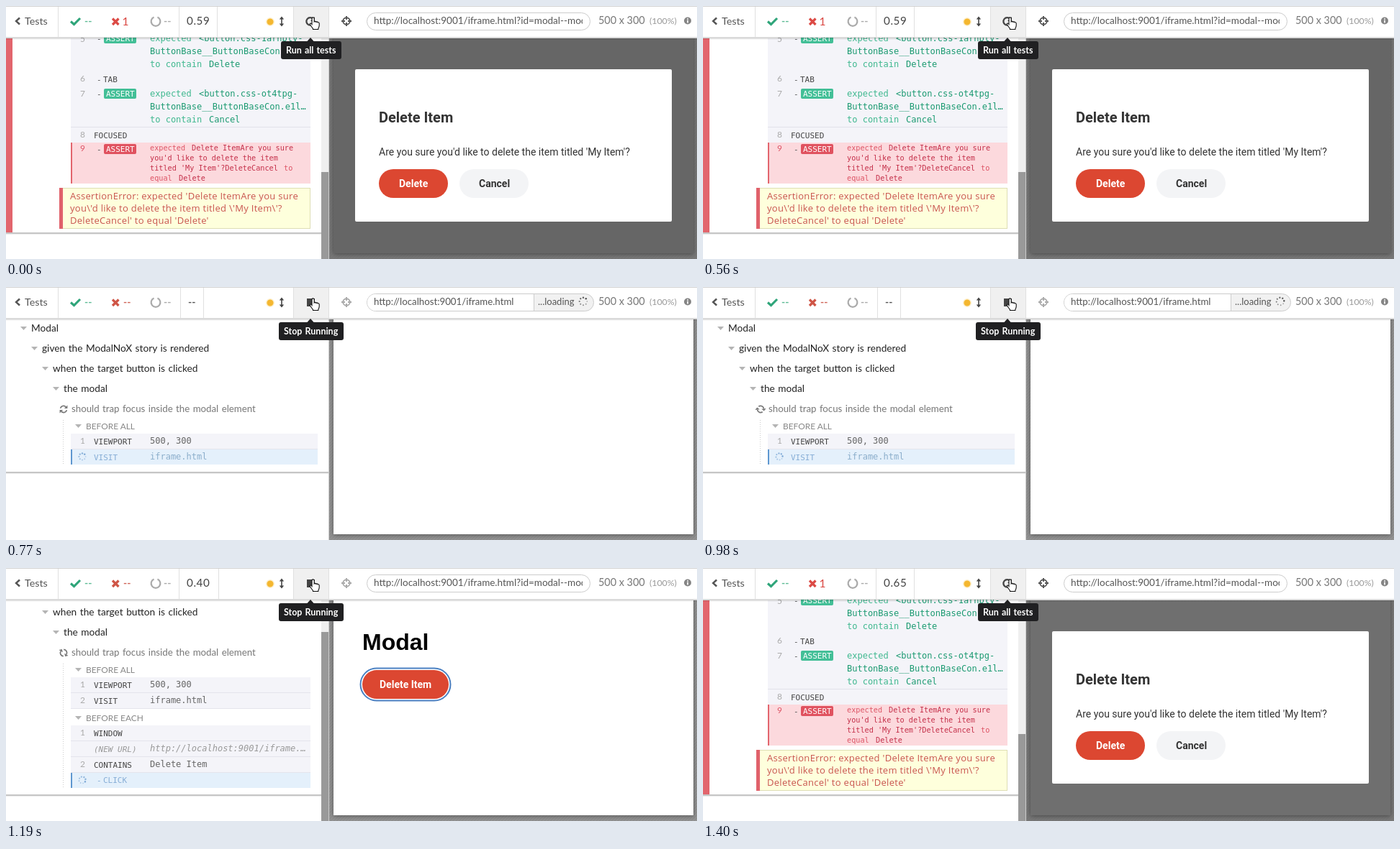
Animation, 960 px wide and 352 px high, one loop 1470 ms. Source, as an HTML page:

```html
<!DOCTYPE html>
<html lang="en">
<head>
<meta charset="utf-8">
<title>Test runner</title>
<style>
html, body { margin: 0; width: 100%; height: 100%; overflow: hidden; background: #fff; }
svg { display: block; width: 100%; height: 100%; font-family: Lato, sans-serif; }
.mono { font-family: "DejaVu Sans Mono", monospace; }
.rob { font-family: Roboto, sans-serif; }
.ari { font-family: "Liberation Sans", Arial, sans-serif; }
.err { font-family: "Open Sans", sans-serif; letter-spacing: .3px; }
.word { word-spacing: 1px; }
.wide { letter-spacing: .6px; }
.b { font-weight: 700; }
.light { font-weight: 300; }
.it { font-style: italic; }
</style>
</head>
<body>
<svg id="stage" viewBox="0 0 960 352"></svg>
<script>
const FRAME = 70, LOOP = 1470;
const esc = s => s.replace(/&/g, '&amp;').replace(/</g, '&lt;');
const text = (x, y, s, size, fill, cls = '', more = '') =>
  `<text x="${x}" y="${y}" font-size="${size}" fill="${fill}" class="${cls}" ${more}>${esc(s)}</text>`;
const rect = (x, y, w, h, fill, more = '') =>
  `<rect x="${x}" y="${y}" width="${w}" height="${h}" fill="${fill}" ${more}/>`;
const line = (d, stroke, w = 1, more = '') =>
  `<path d="${d}" fill="none" stroke="${stroke}" stroke-width="${w}" ${more}/>`;
const shape = (d, fill) => `<path d="${d}" fill="${fill}"/>`;
const group = (id, body, more = '') => `<g id="${id}" ${more}>${body}</g>`;
const mono = (x, y, s, fill, size = 12, cls = '') => text(x, y, s, size, fill, 'mono ' + cls);

function dots(x, y, r, color) {
  let s = '';
  for (let i = 0; i < 8; i++) {
    const a = i * Math.PI / 4;
    s += `<circle cx="${(r * Math.cos(a)).toFixed(2)}" cy="${(r * Math.sin(a)).toFixed(2)}" r="${.85 + i * .06}" opacity="${.5 + i * .07}"/>`;
  }
  return `<g transform="translate(${x} ${y})"><g class="spin" fill="${color}">${s}</g></g>`;
}

// Command log
const caret = (x, y) => shape(`M${x} ${y}h9l-4.5 5z`, '#b4b4b4');
const suite = (x, y, s) => caret(x - 15, y - 7) + text(x, y, s, 13.7, '#222', 'word');
const hook = (y, s) => caret(96, y - 7) + text(111, y, s, 11.9, '#888');
const num = (y, n) => text(103, y, n, 12, '#aaa');
const row = (y, w, n, name, msg, cls = '') =>
  rect(90, y, w, 21, '#f4f4f9') + rect(90, y + 21, w, 1, '#e4e4ec') + num(y + 14, n) +
  mono(122, y + 15, name, cls ? '#999' : '#444', 11, cls) +
  mono(200, y + 14, msg, cls ? '#999' : '#666', 12, cls);
const active = (y, w) =>
  rect(90, y, w, 21, '#e4f0fb') + rect(90, y, 2, 21, '#5f97d0') + dots(106, y + 10, 4.6, '#7ea9d6');
const reload = (x, y) => `<g transform="translate(${x} ${y})"><g class="spin">` +
  line('M-4.4 -1.3A4.5 4.5 0 0 1 3.2 -3.2M4.4 1.3A4.5 4.5 0 0 1 -3.2 3.2', '#777', 1.7) +
  shape('M5.4-5.4V-.9H.9ZM-5.4 5.4V.9H-.9Z', '#777') + '</g></g>';
const edge = (y, w) => rect(0, y, w, 2, '#c6c6c6') + rect(0, y + 2, w, 1, '#ececec');
const bar = y => rect(438, 45, 10, 307, '#efefef') + rect(438, y, 10, 352 - y, '#999');
const trail = (y, h) => line(`M79.5 ${y}v${h}`, '#ccc', 1, 'stroke-dasharray="1 2"');

const tree = suite(35, 62, 'Modal') + suite(50, 90, 'given the ModalNoX story is rendered') +
  suite(65, 118, 'when the target button is clicked') + suite(80, 146, 'the modal') +
  reload(80, 170) + text(91, 174, 'should trap focus inside the modal element', 13.27, '#777', 'word') +
  hook(198, 'BEFORE ALL');

const visiting = tree + trail(185, 63) + row(204, 343, '1', 'VIEWPORT', '500, 300') + active(226, 343) +
  mono(122, 241, 'VISIT', '#86add6', 11) + mono(200, 240, 'iframe.html', '#8baecb') + edge(257, 448);

const clicking = `<g transform="translate(0 -52)">${tree}</g>` + trail(133, 172) +
  row(152, 333, '1', 'VIEWPORT', '500, 300') + row(174, 333, '2', 'VISIT', 'iframe.html') +
  hook(213, 'BEFORE EACH') + row(219, 333, '1', 'WINDOW', '') +
  row(241, 333, '', '(NEW URL)', 'http://localhost:9001/iframe.…', 'it') +
  row(263, 333, '2', 'CONTAINS', 'Delete Item') + active(285, 333) +
  mono(126, 299, '-', '#86add6', 11) + mono(135, 299, 'CLICK', '#86add6', 11) + edge(315, 438) + bar(89);

const GREEN = '#3fb88f', DEEP = '#1b9a71', PINK = '#dd5566', ROSE = '#c42f49';
const badge = (y, fill) => mono(126, y + 11, '-', '#555', 11) +
  rect(136, y, 45, 14, fill, 'rx="2"') + mono(139, y + 11, 'ASSERT', '#fff', 11);
const passed = (y, sel, what) => badge(y - 11, '#43bf97') +
  mono(200, y, 'expected', GREEN) + mono(268, y, sel, DEEP) +
  mono(200, y + 18, 'ButtonBase__ButtonBaseCon.e1l…', DEEP) +
  mono(200, y + 36, 'to contain', GREEN) + mono(282, y + 36, what, DEEP);
const small = (x, y, s, fill) => mono(x, y, s, fill, 10.2);

const failed = rect(0, 45, 9, 270, '#e2656d') + rect(90, 45, 333, 145, '#f4f4f9') +
  rect(90, 168, 333, 1, '#e2e2ea') +
  num(50, '5') + passed(49, '<button.css-1arnbly-', 'Delete') +
  num(105, '6') + mono(126, 106, '-', '#555', 11) + mono(135, 106, 'TAB', '#444', 11) +
  num(126, '7') + passed(126, '<button.css-ot4tpg-', 'Cancel') +
  num(183, '8') + mono(122, 184, 'FOCUSED', '#444', 11) +
  rect(90, 190, 333, 57, '#fcd9dd') + rect(90, 190, 2, 57, '#e2656d') +
  text(103, 202, '9', 12, PINK) + badge(192, '#e0525f') +
  small(200, 201, 'expected', PINK) + small(258, 201, 'Delete ItemAre you sure', ROSE) +
  small(200, 215, "you'd like to delete the item", ROSE) +
  small(200, 229, "titled 'My Item'?DeleteCancel", ROSE) + small(386, 229, 'to', PINK) +
  small(200, 243, 'equal', PINK) + small(240, 243, 'Delete', ROSE) +
  rect(74.5, 253.5, 348, 56, '#feffdc', 'stroke="#dedeb4"') + rect(74, 253, 5, 57, '#e0616b') +
  ["AssertionError: expected 'Delete ItemAre you sure",
   "you\\'d like to delete the item titled \\'My Item\\'?",
   "DeleteCancel' to equal 'Delete'"].map((s, i) => text(89, 269 + 17 * i, s, 13, '#c9544f', 'err')).join('') +
  edge(315, 438) + bar(231);

// Preview pages
const house = '<g transform="translate(-.5 -1)">' +
  line('M677 150L704.5 126.5L733 150', '#444', 5, 'stroke-linejoin="round"') +
  shape('M717 124h9v17l-9-7.5z', '#444') +
  shape('M684 150.5L704.5 133.5L726 150.5V168q0 3-3 3H710V156H700V171H687q-3 0-3-3z', '#444') + '</g>';
const blank = rect(475, 64, 460, 290, '#f2f2f2', 'rx="5"') + house +
  text(574, 212, 'This is the default blank page.', 20, '#444', 'rob light') +
  text(579.5, 256, 'To test your web application:', 20, '#444', 'rob light') +
  rect(595, 278, 220, 90, '#dfdfdf', 'rx="8"') +
  text(619.5, 316, '1.', 14.2, '#333', 'ari') + text(635, 316, "Start your app's server", 14.2, '#333', 'ari') +
  text(619.5, 340, '2.', 14.2, '#333', 'ari') + rect(635, 325, 84, 21, '#777', 'rx="3"') +
  text(640, 340, 'cy.visit()', 12.4, '#fff', 'mono b') + text(723, 340, 'your app', 14.2, '#333', 'ari');

const story = text(495, 114, 'Modal', 32, '#000', 'ari b') +
  rect(492.5, 139.5, 125, 45, '#fff', 'rx="22.5" stroke="#4a80c2" stroke-width="2"') +
  rect(495, 142, 120, 40, '#dc4731', 'rx="20"') + text(519, 167, 'Delete Item', 14, '#fff', 'rob b');

const dialog = rect(455, 45, 500, 299, '#000', 'id="shade"') +
  rect(484, 87, 442, 214, '#6d9dec', 'id="ring" rx="2" stroke="#6d9dec" stroke-width="3"') +
  rect(485, 88, 440, 212, '#fff', 'rx="2"') +
  text(518, 162, 'Delete Item', 20, '#333', 'rob b') +
  text(518, 208, "Are you sure you'd like to delete the item titled 'My Item'?", 14, '#333', 'rob') +
  rect(518, 227, 96, 40, '#dc4731', 'rx="20"') + text(546, 252, 'Delete', 14, '#fff', 'rob b') +
  rect(630, 227, 96, 40, '#f3f4f6', 'rx="20"') + text(657, 252, 'Cancel', 14, '#333', 'rob b');

// Toolbar
const sep = (x, more) => rect(x, 1, 1, 43, '#e0e0e0', more);
const toolbar = rect(0, 44, 960, 3, 'url(#drop)') + rect(0, 0, 960, 44, '#fff') + rect(399, 0, 49, 44, '#f0f0f0') +
  sep(72) + sep(399) + sep(448) + sep(240, 'id="sepA"') + sep(293, 'id="sepB"') +
  rect(0, 0, 960, 1, '#d2d2d2') + rect(0, 43, 960, 1, '#dedede') +
  line('M19 16.5L14 21L19 25.5', '#555', 2.4) + text(26, 26, 'Tests', 14.3, '#555') +
  line('M90 21.5L94.5 25.5L103 17', '#2fa57a', 3.1) + text(109, 26, '--', 14, '#5dbb95', 'b') +
  group('cross', line('M148 17.5L156.5 26M156.5 17.5L148 26', 'currentColor', 3.2)) +
  text(163, 26, '--', 14, '#cf6558', 'b', 'id="none"') + text(161.5, 26.5, '1', 15.5, '#d9443f', '', 'id="one"') +
  line('M205.5 15.5A6.4 6.4 0 1 0 210.5 15.5', '#aaa', 2.2) + text(219, 26, '--', 14, '#aaa', 'b') +
  text(251, 26, '0.59', 15.2, '#444', 'wide', 'id="timer"') + text(253, 26, '--', 14, '#555', 'b', 'id="unset"') +
  '<circle cx="367" cy="22" r="5.3" fill="#f4b730" stroke="#fdf0cf" stroke-width="1.5"/>' +
  line('M383 17V26', '#444', 1.6) + shape('M383 14.5l3.2 4h-6.4zM383 28.5l3.2-4h-6.4z', '#444') +
  group('rerun', line('M426.5 18A5.2 5.2 0 1 0 427.5 23', '#444', 2.3) + shape('M429 15v6h-6z', '#444')) +
  group('stop', rect(418, 16, 11, 11, '#444')) +
  group('aim', '<circle cx="473" cy="21" r="4.8" fill="none" stroke-width="1.9"/>' +
    '<path d="M473 14V19M473 23V28M466 21H471M475 21H480" stroke-width="1.9"/>') +
  group('urlLong', rect(501.5, 9.5, 310, 24, '#fff', 'rx="12" stroke="#ccc"') +
    `<g clip-path="url(#urlClip)">${text(511, 25, 'http://localhost:9001/iframe.html?id=modal--modal', 13.5, '#555')}</g>`) +
  group('urlLoad', rect(501.5, 9.5, 315, 24, '#f1f1f1', 'rx="12" stroke="#ccc"') +
    shape('M733 10H513.5a11.5 11.5 0 0 0 0 23H733z', '#fff') + rect(733, 10, 1, 23, '#ccc') +
    text(511, 25, 'http://localhost:9001/iframe.html', 13.25, '#555') +
    text(739, 25, '...loading', 13, '#555') + dots(802, 20, 5.3, '#555')) +
  text(823, 25, '500 x 300', 14.4, '#777') + text(894, 25, '(100%)', 12.3, '#999') +
  '<circle cx="947" cy="20.5" r="5" fill="#858585"/>' + rect(946.2, 19.7, 1.7, 3.8, '#fff') + rect(946.2, 17.2, 1.7, 1.6, '#fff');

const tip = (id, x, w, s) => group(id, rect(x, 49, w, 25, '#202022', 'rx="3"') + shape('M418 49.5L423 44L428 49.5z', '#202022') +
  text(x + 7, 66, s, 12.5, '#fff', 'b word'));
const hand = '<path d="M425 17.5a1.6 1.6 0 0 1 3.2 0V22c.8-1 2.4-.8 2.6.3 .8-.8 2.2-.5 2.4.6 .9-.5 2 0 2 1.2V27c0 2-1 3-1.4 4.5V32.500H426.500V31.500c-1-1.5-3.5-4.5-4.2-6 -.5-1.2 1-2 2-.9l.7.9z" fill="#fff" stroke="#111" stroke-width="1.1"/>';

const svg = document.getElementById('stage');
svg.innerHTML = `<defs>
  <pattern id="hatch" width="3" height="3" patternUnits="userSpaceOnUse" patternTransform="rotate(45)">
    ${rect(0, 0, 3, 3, '#959595')}${rect(0, 0, 1.5, 3, '#8b8b8b')}</pattern>
  <linearGradient id="drop" x2="0" y2="1"><stop stop-opacity=".2"/><stop offset="1" stop-opacity="0"/></linearGradient>
  <filter id="blur" x="-10%" y="-10%" width="120%" height="120%"><feGaussianBlur stdDeviation="3"/></filter>
  <clipPath id="urlClip">${rect(505, 9, 296, 25, '#000')}</clipPath>
  <clipPath id="page">${rect(455, 45, 500, 299, '#000')}</clipPath>
  <clipPath id="right">${rect(449, 45, 511, 307, '#000')}</clipPath>
  </defs>` + rect(0, 0, 960, 352, '#fff') +
  group('failed', failed) + group('visiting', visiting) + group('clicking', clicking) +
  `<g clip-path="url(#right)">` + rect(449, 45, 511, 307, 'url(#hatch)') +
  rect(449, 45, 511, 307, '#666', 'id="dim" opacity=".6"') +
  rect(455, 40, 500, 305, '#000', 'opacity=".4" filter="url(#blur)"') + rect(455, 45, 500, 299, '#fff') + '</g>' +
  `<g clip-path="url(#page)">` + group('blank', blank) + group('story', story) + group('dialog', dialog) + '</g>' +
  rect(448, 45, 1, 307, '#ccc') + toolbar + tip('tipRun', 382, 84, 'Run all tests') + tip('tipStop', 379, 90, 'Stop Running') + hand;

const el = {};
svg.querySelectorAll('[id]').forEach(n => el[n.id] = n);
const spins = svg.querySelectorAll('.spin');
const show = (on, ...ids) => ids.forEach(id => el[id].style.display = on ? '' : 'none');

function draw(ms) {
  const t = Math.floor(ms % LOOP / FRAME) * FRAME;
  const fail = t < 630 || t >= 1400, empty = t >= 630 && t < 770;
  const load = t >= 770 && t < 1050, click = t >= 1050 && t < 1400;
  const modal = fail || t >= 1330, idle = fail || empty, timed = fail || click;

  show(fail, 'failed', 'dim', 'one');
  show(!fail, 'ring', 'none');
  show(load, 'visiting', 'urlLoad');
  show(!load, 'urlLong');
  show(click, 'clicking');
  show(empty, 'blank');
  show(click && !modal, 'story');
  show(modal, 'dialog');
  show(idle, 'rerun', 'tipRun');
  show(!idle, 'stop', 'tipStop');
  show(timed, 'timer');
  show(!timed, 'unset');

  el.shade.setAttribute('opacity', t < 630 ? .6 : t < 1400 ? .13 : .565);
  el.aim.setAttribute('stroke', fail ? '#555' : '#aaa');
  el.cross.style.color = fail ? '#dc4a45' : '#cf5546';
  el.timer.textContent = t < 630 ? '0.59' : fail ? '0.65' : '0.40';
  el.sepA.setAttribute('x', timed ? 240 : 242);
  el.sepB.setAttribute('x', fail ? 293 : click ? 295 : 274);

  const turn = `rotate(${(t - 770) * .18})`;
  spins.forEach(n => n.setAttribute('transform', turn));
}

const start = performance.now();
(function tick() {
  draw(performance.now() - start);
  requestAnimationFrame(tick);
})();
</script>
</body>
</html>
```
